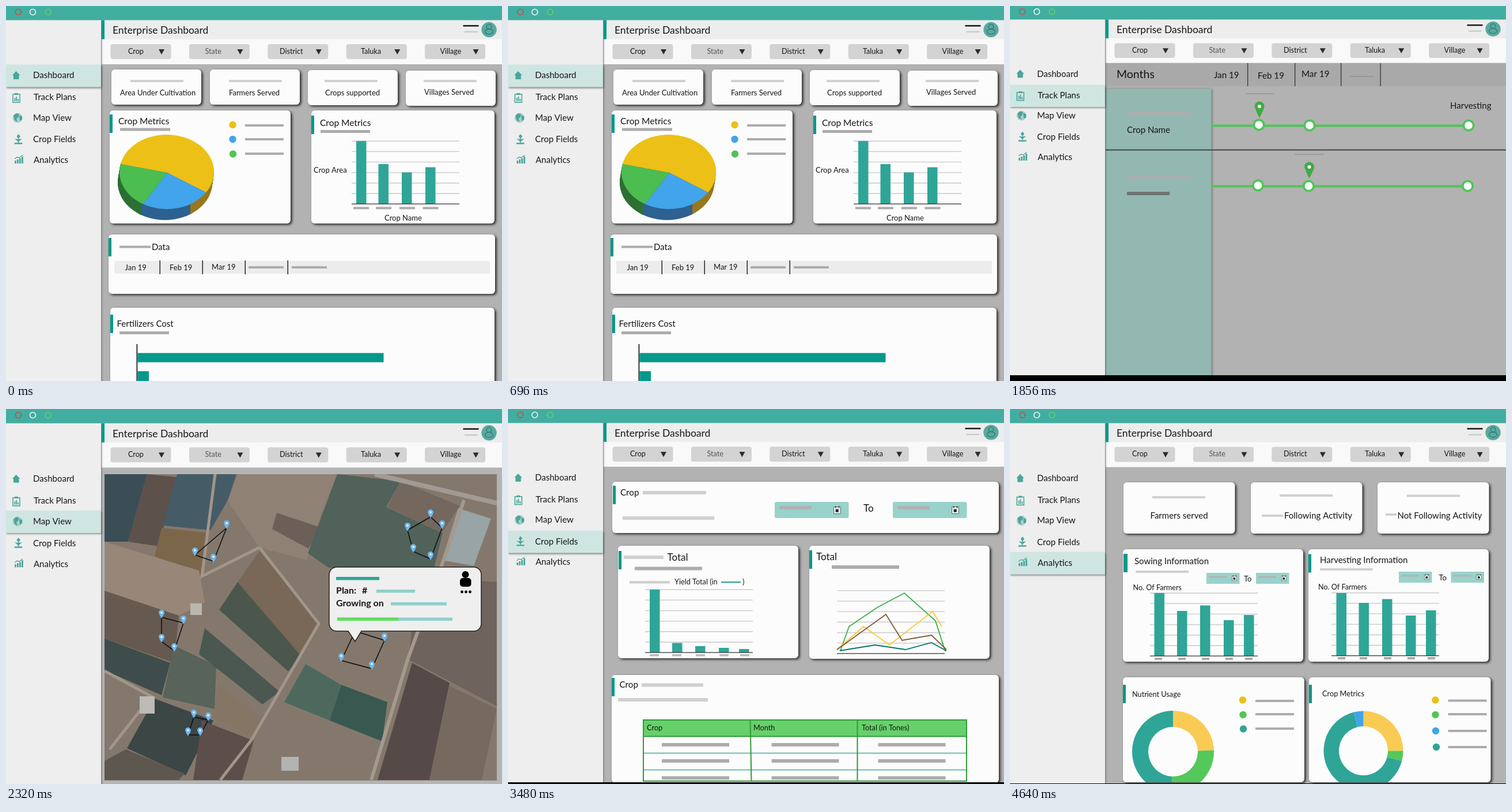
Write an HTML page with a canvas that moves like this. It is 861x650 px and loops after 5.76 s.

```html
<!DOCTYPE html>
<html lang="en">
<head>
<meta charset="utf-8">
<title>Enterprise Dashboard</title>
<style>
html, body { margin: 0; width: 100%; height: 100%; overflow: hidden; background: #b0b0b0; }
canvas { display: block; }
</style>
</head>
<body>
<canvas id="stage" width="861" height="650"></canvas>
<script>
const ctx = document.getElementById('stage').getContext('2d');
const TEAL = '#2fa598', DEEP = '#06988a', SOFT = '#99d2cb', GREEN = '#4fc556',
      YELLOW = '#ecc016', BLUE = '#42a4ea', LIGHT = '#d0d0d0', MID = '#acacac', INK = '#161616';

// ---- helpers ----
function rect(x, y, w, h, color, radius = 0) {
  ctx.fillStyle = color;
  ctx.beginPath();
  ctx.roundRect(x, y, w, h, radius);
  ctx.fill();
}
function shadow(dx, dy, blur, alpha, draw) {
  ctx.save();
  ctx.shadowColor = `rgba(0,0,0,${alpha})`;
  ctx.shadowOffsetX = dx;
  ctx.shadowOffsetY = dy;
  ctx.shadowBlur = blur;
  draw();
  ctx.restore();
}
// y is the middle of the capital letters
function text(str, x, y, size = 15, color = INK, weight = 400) {
  ctx.font = `${weight} ${size}px Lato, sans-serif`;
  ctx.fillStyle = color;
  ctx.fillText(str, x, y + size * 0.36);
}
// pts: flat list x0, y0, x1, y1, ...
function trace(pts, close) {
  ctx.beginPath();
  for (let i = 0; i < pts.length; i += 2) ctx.lineTo(pts[i], pts[i + 1]);
  if (close) ctx.closePath();
}
function line(pts, color, width = 1, close = false) {
  trace(pts, close);
  ctx.strokeStyle = color;
  ctx.lineWidth = width;
  ctx.stroke();
}
function poly(color, ...pts) {
  trace(pts, true);
  ctx.fillStyle = color;
  ctx.fill();
}
function disc(x, y, r, color) {
  ctx.fillStyle = color;
  ctx.beginPath();
  ctx.arc(x, y, r, 0, 7);
  ctx.fill();
}
function ring(x, y, rx, ry, color, width) {
  ctx.strokeStyle = color;
  ctx.lineWidth = width;
  ctx.beginPath();
  ctx.ellipse(x, y, rx, ry, 0, 0, 7);
  ctx.stroke();
}
function card(x, y, w, h, markX, markY, markW = 5) {
  shadow(2.5, 2, 4, 0.8, () => rect(x, y, w, h, '#fcfcfc', 6));
  if (markX) rect(markX, markY, markW, 32, DEEP);
}
function legend(rows) {
  for (const [x, y, color, lineX, lineY] of rows) {
    disc(x, y, 6.2, color);
    rect(lineX, lineY, 67, 4, MID);
  }
}
// tops: bar x and top pairs; base is the axis
function barChart(x, base, bars) {
  for (let i = 1; i <= 6; i++) rect(x, base - i * 18.2 - 0.5, 187, 1.6, LIGHT);
  for (const [bx, top] of bars) rect(bx, top, 17.5, base - top, TEAL);
  rect(x, base - 0.5, 187, 1.3, '#333');
}
function calendar(x, y, s) {
  ctx.strokeStyle = '#333';
  ctx.lineWidth = s / 9;
  ctx.strokeRect(x - s / 2, y - s / 2, s, s);
  rect(x - s / 2, y - s / 2, s, s, '#e2efed');
  rect(x - s / 4, y - s / 6, s / 2.2, s / 2.2, '#222');
  rect(x - s / 3, y - s * 0.62, s * 0.16, s * 0.25, '#333');
  rect(x + s / 5, y - s * 0.62, s * 0.16, s * 0.25, '#333');
}
function pin(x, y, r, color, drop) {
  ctx.fillStyle = color;
  ctx.beginPath();
  ctx.arc(x, y, r, Math.PI * 0.88, Math.PI * 0.12);
  ctx.quadraticCurveTo(x + r * 0.7, y + r, x, y + drop);
  ctx.quadraticCurveTo(x - r * 0.7, y + r, x - r, y);
  ctx.fill();
  disc(x, y, r * 0.36, '#fff');
}

// ---- dashboard ----
function pie() {
  const cx = 279, cy = 287.5, rx = 82, ry = 64.5;
  for (const [from, to, color] of [[190, 235, '#2d7034'], [235, 320, '#2d6190'], [320, 365, '#98771d']]) {
    ctx.save();
    ctx.beginPath();
    ctx.rect(from, 270, to - from, 110);
    ctx.clip();
    ctx.fillStyle = color;
    for (let k = 19; k > 0; k--) {
      ctx.beginPath();
      ctx.ellipse(cx - k * 3 / 19, cy + k, rx, ry, 0, 0, 7);
      ctx.fill();
    }
    ctx.restore();
  }
  for (const [a, b, color] of [[3.353, 6.868, YELLOW], [0.585, 2.094, BLUE], [2.094, 3.353, '#4cbd50']]) {
    ctx.fillStyle = color;
    ctx.beginPath();
    ctx.moveTo(280, 289);
    ctx.ellipse(cx, cy, rx, ry, 0, a, b);
    ctx.fill();
  }
}
function dashboard() {
  const tiles = [
    [183, 110, 'Area Under Cultivation', 198, 150, 216], [354, 110, 'Farmers Served', 387, 150, 387],
    [524, 111, 'Crops supported', 554, 150, 553], [694, 112, 'Villages Served', 726, 149, 725]];
  for (const [x, y, label, tx, ty, lx] of tiles) {
    card(x, y, 156, 61);
    rect(lx, 128, 92, 4, LIGHT);
    text(label, tx, ty, 13);
  }
  card(180, 181, 314, 196, 180, 188);
  text('Crop Metrics', 195, 199, 15.5);
  rect(198, 211.5, 87, 5, MID);
  pie();
  legend([[393.5, 206, YELLOW, 415, 205], [393.5, 231, BLUE, 415, 229], [394, 256.5, GREEN, 415, 254]]);

  card(530, 181, 318, 196, 530, 190);
  text('Crop Metrics', 545, 202, 15.5);
  rect(546, 215, 86, 5, MID);
  barChart(600, 343, [[608, 234], [646.5, 274], [687, 288.5], [728, 279.5]]);
  for (const x of [603, 642, 683, 723.5]) rect(x, 348.3, 27, 4, MID);
  text('Crop Area', 534, 284, 13);
  text('Crop Name', 657, 367, 13);

  card(178, 396, 671, 103, 178, 402);
  rect(197, 415.5, 54, 4, MID);
  text('Data', 253, 418);
  rect(188, 442, 652, 22, '#ececec');
  for (let i = 0; i < 4; i++) rect(266.5 + i * 74, 441, 1.5, 24, '#222');
  ['Jan 19', 'Feb 19', 'Mar 19'].forEach((m, i) => text(m, [206.5, 284, 357][i], i < 2 ? 453 : 452, 13));
  rect(421, 451, 61, 4, MID);
  rect(496, 451, 61, 4, MID);

  card(181, 523, 667, 150, 181, 535);
  text('Fertilizers Cost', 192.5, 550.5);
  rect(197, 564, 86, 5, MID);
  rect(226.5, 586, 1.8, 64, '#222');
  rect(228.5, 601.5, 427, 16, DEEP);
  rect(228.5, 633, 19.5, 17, DEEP);
}

// ---- track plans ----
function trackPlans() {
  rect(166, 98, 695, 41, '#a9a9a9');
  text('Months', 185, 117.5, 19.5);
  text('Jan 19', 354, 119.5, 15.2);
  text('Feb 19', 430, 120.5, 15.2);
  text('Mar 19', 506, 118, 15.2);
  for (const x of [412, 494, 574, 642.5]) rect(x, 99, 1.3, 40, '#333');
  rect(590, 121.5, 42, 1.2, '#8c8c8c');
  shadow(1, 0, 4, 0.35, () => rect(166, 143.5, 183.5, 500, '#93b7b1'));
  rect(166, 248.5, 695, 2, '#444');
  rect(204, 183.5, 109, 5.5, '#adadad');
  text('Crop Name', 203, 214.5);
  rect(204, 293.5, 109, 5.5, '#adadad');
  rect(203, 322, 74, 6, '#6f7372');
  text('Harvesting', 764, 173);
  const tracks = [[350, 207, [432, 520, 796], 433, 174, 408], [349, 312, [430.5, 518.5, 794.5], 519.5, 279, 494]];
  for (const [start, y, nodes, pinX, pinY, lineX] of tracks) {
    rect(start, y - 1.6, nodes[2] - start, 4.2, GREEN);
    nodes.forEach((x, i) => {
      disc(x, y - (i ? 0 : 1), 10.5, GREEN);
      disc(x, y - (i ? 0 : 1), 6.8, '#fff');
    });
    pin(pinX, pinY, 8.5, '#3fab45', 20);
    rect(lineX, pinY - 22.5, 51, 1.2, '#919191');
  }
}

// ---- map view ----
function fields() {
  rect(171, 113, 681, 531, '#84786d');
  poly('#3b4e56', 171, 113, 245, 113, 212, 230, 171, 230);
  poly('#5d514c', 245, 113, 297, 118, 265, 238, 212, 230);
  poly('#455c66', 297, 113, 400, 113, 385, 158, 355, 210, 272, 202);
  poly('#7c664a', 270, 206, 352, 215, 340, 292, 258, 255);
  poly('#8f8275', 402, 113, 575, 113, 548, 180, 522, 262, 440, 240, 385, 160);
  poly('#6b5f58', 470, 180, 545, 205, 525, 242, 462, 208);
  poly('#506259', 575, 113, 685, 125, 660, 170, 758, 215, 742, 280, 560, 275, 524, 250);
  poly('#73675e', 685, 125, 788, 168, 757, 214, 662, 170);
  poly('#98a4a6', 785, 172, 842, 190, 812, 272, 757, 262);
  poly('#988779', 171, 230, 335, 280, 345, 335, 300, 358, 171, 330);
  poly('#66594f', 171, 315, 300, 358, 292, 440, 171, 398);
  poly('#3e4d4b', 171, 398, 285, 440, 270, 496, 171, 453);
  poly('#586359', 292, 410, 365, 445, 362, 520, 272, 500);
  poly('#796757', 440, 246, 543, 372, 508, 425, 402, 300);
  poly('#4b574d', 402, 300, 512, 428, 490, 455, 370, 348);
  poly('#4a5851', 345, 380, 475, 490, 445, 512, 335, 425);
  poly('#857565', 368, 474, 448, 540, 432, 572, 360, 535);
  poly('#4d695e', 520, 442, 582, 478, 562, 540, 483, 508);
  poly('#385850', 582, 478, 662, 508, 653, 576, 562, 540);
  poly('#6f635d', 710, 290, 852, 300, 852, 515, 700, 435);
  poly('#554a47', 705, 440, 770, 475, 735, 643, 645, 643);
  poly('#766a60', 770, 480, 852, 520, 826, 643, 735, 643);
  poly('#3b4645', 258, 502, 360, 540, 312, 635, 210, 588);
  poly('#5b4e4b', 340, 540, 430, 575, 410, 643, 325, 643);
  poly('#5e5750', 208, 590, 310, 632, 300, 643, 171, 643, 171, 610);
  line([640, 113, 852, 163], '#a29b94', 8);
  line([795, 158, 755, 275, 697, 435, 634, 643], '#a4998d', 6);
  line([440, 240, 543, 372, 425, 575, 372, 643], '#a2968a', 5);
  line([363, 113, 340, 290, 440, 240], '#a2968a', 5);
  line([171, 454, 252, 498, 180, 590], '#a2968a', 5);
  rect(232, 498, 26, 30, '#bdbab4');
  rect(320, 337, 20, 20, '#bbb7ae');
  rect(478, 603, 30, 24, '#b3b3af');
}
function mapView() {
  rect(166, 102, 695, 548, '#b4b4b4');
  ctx.save();
  ctx.beginPath();
  ctx.rect(171, 113, 681, 531);
  ctx.clip();
  fields();
  ctx.restore();
  const plots = [
    [383, 198, 328, 245, 360, 256],
    [697, 202, 737, 179, 757, 198, 737, 252, 707, 239],
    [270, 353, 308, 363, 292, 411, 270, 395],
    [326, 526, 351, 531, 337, 557, 316, 557],
    [582, 428, 635, 442, 657, 393, 606, 377]];
  for (const p of plots) {
    line(p.map((v, i) => i % 2 ? v + 8 : v), '#0c0c0c', 1.5, true);
    for (let i = 0; i < p.length; i += 2) pin(p[i], p[i + 1], 5, '#6fb8ef', 10);
  }
  const x = 561, y = 274, r = 825, b = 385;
  ctx.beginPath();
  ctx.moveTo(617, b);
  ctx.arcTo(r, b, r, y, 13);
  ctx.arcTo(r, y, x, y, 13);
  ctx.arcTo(x, y, x, b, 13);
  ctx.arcTo(x, b, r, b, 13);
  ctx.lineTo(594, b);
  ctx.lineTo(606, 403);
  ctx.closePath();
  ctx.fillStyle = '#efefef';
  ctx.fill();
  ctx.strokeStyle = '#222';
  ctx.lineWidth = 1.5;
  ctx.stroke();
  rect(573, 291, 75, 5.5, TEAL);
  text('Plan:', 573, 314, 16, INK, 700);
  text('#', 618, 314, 16, INK, 700);
  text('Growing on', 573, 336.5, 16, INK, 700);
  rect(643, 313, 67, 5.5, '#90d0ca');
  rect(668, 335, 97, 5.5, '#90d0ca');
  rect(575, 361.5, 200, 5.5, '#90d0ca');
  rect(575, 361.5, 106, 5.5, '#5fde60');
  disc(797.5, 287, 6, '#000');
  rect(788, 293, 19.5, 15, '#000', 5);
  for (let i = 0; i < 3; i++) disc(791.5 + i * 7, 317, 2.4, '#000');
}

// ---- crop fields ----
function cropFields() {
  card(181, 126, 671, 89, 182, 133);
  text('Crop', 195, 144.5, 15.2);
  rect(234, 142, 110, 6, LIGHT);
  rect(199, 186, 159, 6, LIGHT);
  for (const x of [463, 668]) {
    rect(x, 161, 128.5, 28, SOFT, 3);
    rect(x + 8, 168, 56, 6, '#b1b3b2');
    calendar(x + 108.5, 175.5, 11);
  }
  text('To', 617, 171.5, 17);

  card(191, 237, 313, 195, 192, 246);
  rect(201, 254, 69, 6, LIGHT);
  text('Total', 276.5, 257, 17);
  rect(220, 273.5, 117, 6, MID);
  rect(211, 298, 70, 4.5, LIGHT);
  text('Yield Total (in', 289, 299, 12.7);
  rect(370, 299, 34, 2.2, TEAL);
  text(')', 407, 299, 12.7);
  barChart(238, 422, [[246, 313], [285, 405.5], [325, 411], [366, 414], [401, 416]]);
  for (const x of [246, 285, 326, 367, 403]) rect(x, 425, 16, 3.5, '#b9b9b9');

  card(523, 237, 313, 196, 523, 245);
  text('Total', 535, 255.5, 17);
  rect(562, 271, 117, 6, MID);
  barChart(571, 423.7, []);
  line([577, 419, 592, 377, 641, 344, 688, 319, 742, 367, 759, 420], '#3aae49', 1.8);
  line([571, 417, 617, 377, 662, 409, 737, 351, 753, 377], '#f6c939', 1.8);
  line([571, 417, 656, 356, 684, 401, 735, 392, 761, 417], '#805a38', 1.8);
  line([576, 419, 637, 409, 690, 417, 735, 405, 761, 419], '#08736c', 1.8);

  card(180, 461, 672, 187, 180, 466);
  text('Crop', 193.5, 477.5, 15.2);
  rect(232, 475.5, 107, 6, LIGHT);
  rect(191, 501, 156, 6, LIGHT);
  rect(235, 539, 561, 28, '#66d06b');
  for (const y of [596.5, 625.5]) line([235, y, 796, y], '#45aa9f', 1.6);
  line([235, 539, 796, 539, 796, 645, 235, 645], '#2f9a38', 2, true);
  line([235, 567.5, 796, 567.5], '#2f9a38', 2);
  line([420.5, 539, 422.5, 645], '#2f9a38', 2);
  line([606.5, 539, 606.5, 645], '#2f9a38', 2);
  text('Crop', 241, 552, 12.7);
  text('Month', 426, 552.5, 12.7);
  text('Total (in Tones)', 614, 552, 12.7);
  for (const x of [267, 457.5, 642.5])
    for (const y of [579, 607, 636.5]) rect(x, y, 117, 6, MID);
}

// ---- analytics ----
function donut(x, y, r, hole, parts) {
  for (const [from, to, color] of parts) {
    ctx.fillStyle = color;
    ctx.beginPath();
    ctx.arc(x, y, r, from * Math.PI / 180, to * Math.PI / 180);
    ctx.arc(x, y, hole, to * Math.PI / 180, from * Math.PI / 180, true);
    ctx.fill();
  }
}
function dates(x1, x2, y) {
  for (const x of [x1, x2]) {
    rect(x, y, 57.5, 19, SOFT);
    rect(x + 4, y + 5.5, 31, 3, '#b1b3b2');
    calendar(x + 48.5, y + 9.5, 8);
  }
  text('To', x2 - 21, y + 10, 13);
}
function analytics() {
  for (const [x, lineX, lineY] of [[197, 247, 151], [418, 468, 148], [638, 689, 148.5]]) {
    card(x, 127, 193.5, 89);
    rect(lineX, lineY, 92, 4, LIGHT);
  }
  text('Farmers served', 243.5, 185);
  rect(437, 183, 37, 4, LIGHT);
  text('Following Activity', 476, 185);
  rect(652, 181, 19, 4, LIGHT);
  text('Not Following Activity', 672.5, 184.5);

  card(196, 243, 313, 195, 197, 251, 7);
  text('Sowing Information', 216, 264);
  rect(218, 280, 92, 4, LIGHT);
  dates(341, 427, 284);
  text('No. Of Farmers', 213.5, 309.5, 12.6);
  barChart(243, 428, [[250.5, 319], [290, 350], [330, 340.5], [371, 366], [406, 357]]);
  for (const x of [251, 292, 333, 374, 408]) rect(x, 431, 13, 4, MID);

  card(518, 243, 313, 195, 518, 251.5);
  text('Harvesting Information', 538, 262);
  rect(538, 276, 92, 4, LIGHT);
  dates(675, 765.5, 282);
  text('No. Of Farmers', 535, 308.5, 12.6);
  barChart(558, 427.5, [[566.5, 319], [605.5, 336], [646, 329.5], [687, 358], [722, 349]]);
  for (const x of [569, 607, 649, 690, 725]) rect(x, 430, 13, 4, MID);

  card(196, 465, 315, 182, 196, 478);
  card(519, 465, 315.5, 182, 519, 478);
  text('Nutrient Usage', 212, 494.5, 12.7);
  text('Crop Metrics', 542, 493.5, 12.8);
  legend([[404, 504.5, YELLOW, 426, 504], [404.5, 530, GREEN, 426, 527], [405, 554.5, TEAL, 426, 552],
    [738.5, 504.5, YELLOW, 760.5, 503.5], [738.5, 530, GREEN, 760.5, 527],
    [739, 558, BLUE, 760.5, 556], [740, 586, TEAL, 760.5, 584]]);
  ctx.save();
  ctx.beginPath();
  ctx.rect(196, 465, 640, 182);
  ctx.clip();
  donut(283, 594, 71, 43, [[-90, -2, '#facb54'], [-2, 92, '#54c85a'], [92, 270, TEAL]]);
  donut(613.5, 592.5, 69, 42.5, [[-90, 0, '#facb54'], [0, 15, '#54c85a'], [15, 256, TEAL], [256, 270, BLUE]]);
  ctx.restore();
}

// ---- window frame, header and menu ----
function icons() {
  const c = '#4aa59b';
  poly(c, 11, 120, 17.5, 113, 24.5, 120);
  rect(13, 119, 9.5, 8, c);
  ctx.strokeStyle = c;
  ctx.lineWidth = 1.6;
  ctx.strokeRect(12, 153, 12, 14);
  rect(15, 151, 6, 3, c);
  rect(14.5, 159, 1.8, 6, c);
  rect(17.3, 157, 1.8, 8, c);
  rect(20.1, 161, 1.8, 4, c);
  disc(20, 194, 8.5, '#a9cfca');
  poly(c, 13, 190, 18, 186, 23, 188, 21, 193, 18, 195, 20, 201, 15, 198);
  poly(c, 23, 190, 28, 191, 28, 197, 24, 199);
  rect(20.8, 226, 1.6, 11, c);
  poly(c, 21.5, 222, 25, 226, 21.5, 230, 18.5, 226);
  poly(c, 15, 230, 21, 231, 21, 235);
  poly(c, 28, 230, 22, 231, 22, 235);
  rect(14.5, 237, 14, 2.5, c, 1);
  [5, 7, 9, 12].forEach((h, i) => rect(15 + i * 4, 273 - h, 2.8, h, c));
  line([15, 265, 19, 262, 23, 263, 29, 258.5], c, 1.3);
}
function chrome(active, scale, shift) {
  ctx.save();
  ctx.setTransform(1, 0, 0, scale, 0, shift);
  rect(166, 20, 695, 38, '#ededed');
  rect(166, 57.5, 695, 43.5, '#f9f9f9');
  shadow(1, 0, 3, 0.4, () => rect(0, 20, 165, 660, '#eeeeee'));
  rect(0, -3, 861, 27.5, '#42ada1');
  rect(166, 24.5, 5, 33, DEEP);
  ctx.setLineDash([2, 1.2]);
  ring(21.5, 10.5, 5, 5, '#d33c36', 1.7);
  ctx.setLineDash([]);
  ring(46.5, 10.5, 5, 5, '#f4f4f4', 1.6);
  ring(73, 10.5, 5, 5, '#5ed660', 1.5);
  text('Enterprise Dashboard', 185, 42, 17.5);
  rect(793.5, 33, 27, 2.6, '#1d1d1d');
  rect(796, 43.5, 22.5, 2.4, '#c9c9c9');
  disc(838.5, 41, 13.2, '#58aaa1');
  ring(838.5, 35.8, 4.3, 4.2, '#33756f', 1.3);
  ring(838.5, 44.5, 7, 4.4, '#33756f', 1.3);

  const filters = [['Crop', 212], ['State', 345.5], ['District', 475], ['Taluka', 616], ['Village', 753.5]];
  filters.forEach(([label, x], i) => {
    const left = 181.5 + i * 136.4;
    rect(left, 66, 105, 26, '#d3d3d3', 4);
    text(label, x, 78, 12.6, i === 1 ? '#555' : INK);
    poly('#2b2b2b', left + 83.5, 75, left + 93.5, 75, left + 88.5, 84);
  });

  const menu = [['Dashboard', 120], ['Track Plans', 158], ['Map View', 193.5], ['Crop Fields', 231], ['Analytics', 267]];
  shadow(1, 2, 3, 0.45, () => rect(0, menu[active][1] - 18.5, 165, 39, '#cfe5e1'));
  menu.forEach(([label, y], i) => text(label, i === 1 || i === 4 ? 48 : 47, y));
  icons();
  ctx.restore();
}

// scene, vertical scale and shift of the frame, bottom edge
const scenes = [
  [dashboard, 1, 0, 650], [trackPlans, 0.983, -0.5, 640], [mapView, 1.004, 0.2, 650],
  [cropFields, 0.993, -0.2, 647], [analytics, 0.997, 0, 649]];
const HOLD = 1160, LOOP = 5760;
let shown = -1;

function tick() {
  const index = Math.floor(performance.now() % LOOP / HOLD);
  if (index !== shown) {
    shown = index;
    const [draw, scale, shift, bottom] = scenes[index];
    rect(0, 0, 861, 650, '#b2b2b2');
    draw();
    chrome(index, scale, shift);
    rect(0, bottom, 861, 650 - bottom, '#000');
  }
  requestAnimationFrame(tick);
}
tick();
</script>
</body>
</html>
```
